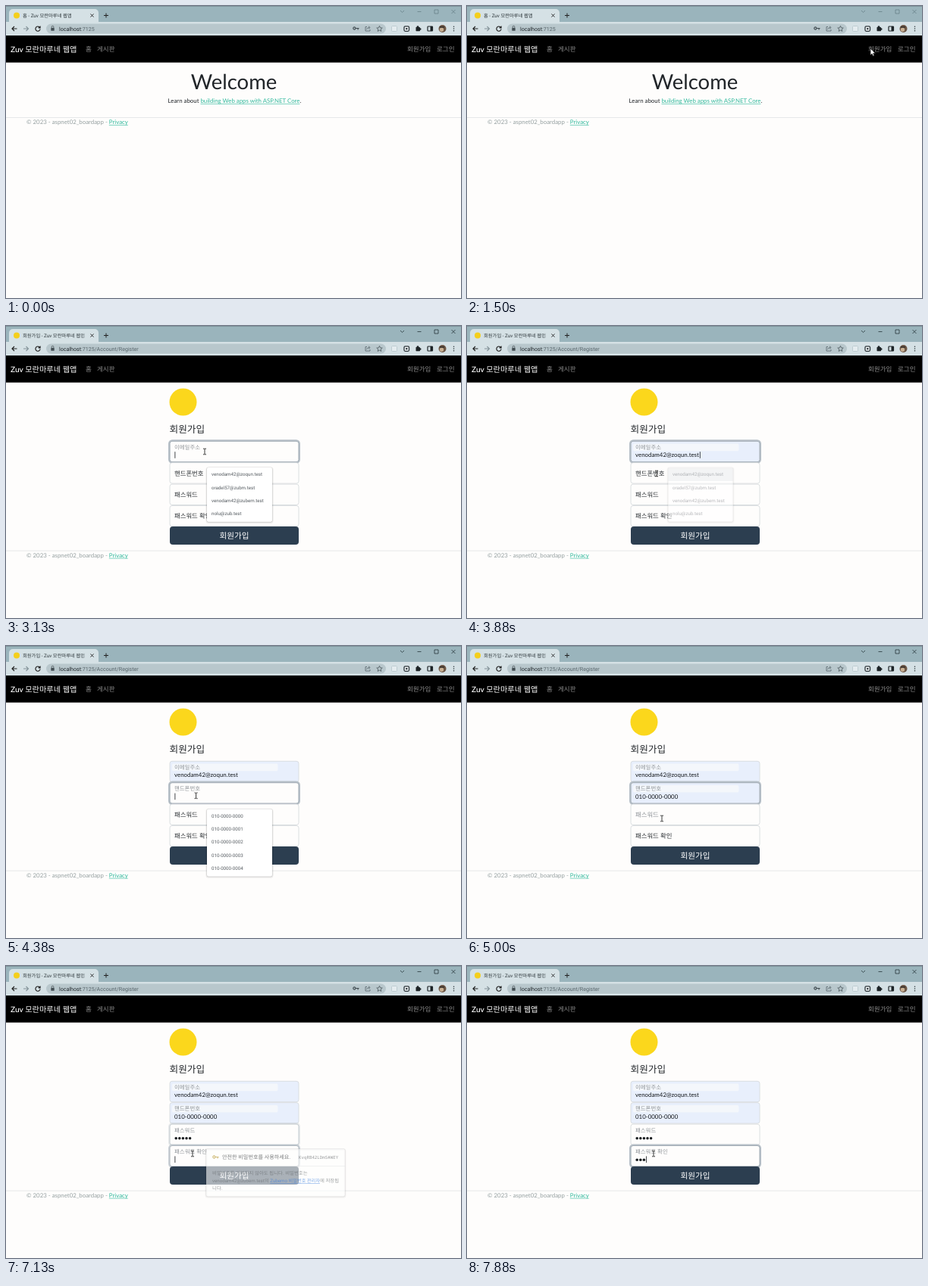
An HTML page with a canvas that plays this animation: 600x386 px, repeating every 8 s.

```html
<!DOCTYPE html>
<html lang="ko">
<head>
<meta charset="utf-8">
<style>
html, body { margin: 0; overflow: hidden; background: #fefdfc; }
canvas { display: block; }
</style>
</head>
<body>
<canvas id="stage" width="600" height="386"></canvas>
<script>
const c = document.getElementById('stage').getContext('2d');
c.textRendering = 'geometricPrecision';
const LOOP = 8000, LOAD = 1880, LOADED = 2630;
const BODY = "Lato, 'Noto Sans CJK KR', sans-serif";
const UI = "Roboto, 'Noto Sans CJK KR', sans-serif";
const MONO = "'Noto Sans Mono', monospace";
const BRAND = 'Zuv 모란마루네 웹앱';
const EMAIL = 'venodam42@zoqun.test', PHONE = '010-0000-0000';
const MAILS = [EMAIL, 'oradel57@zubm.test', 'venodam42@zubem.test', 'nolu@zub.test'];
const PHONES = [PHONE, '010-0000-0001', '010-0000-0002', '010-0000-0003', '010-0000-0004'];

// blur = when the field loses focus
const FIELDS = [
  { label: '이메일주소', focus: 2880, blur: 4130, value: EMAIL, filled: 3750 },
  { label: '핸드폰번호', focus: 4130, blur: 4980, value: PHONE, filled: 4700 },
  { label: '패스워드', focus: 4980, blur: 7000, keys: [5500, 5630, 5880, 6000, 6130] },
  { label: '패스워드 확인', focus: 7000, blur: 9000, keys: [7380, 7630, 7880] },
];
const POINTER = [
  [1100, 420, 390], [1480, 532, 56], [1900, 532, 56], [2370, 310, 123], [2450, 310, 123],
  [2800, 262, 166], [3400, 262, 166], [3800, 250, 195], [4300, 250, 195], [4750, 257, 228],
  [6130, 257, 228], [6450, 243, 248], [6750, 243, 248], [7000, 246, 248], [8000, 246, 248],
];

const clamp = v => Math.max(0, Math.min(1, v));
const ease = v => { v = clamp(v); return v * v * (3 - 2 * v); };
const mix = (a, b, k) => a + (b - a) * k;

function text(s, x, y, size, color, font = BODY, align = 'left', weight = 400) {
  c.font = `${weight} ${size}px ${font}`;
  c.fillStyle = color;
  c.textAlign = align;
  c.fillText(s, x, y);
  return x + c.measureText(s).width;
}
function link(s, x, y, size, color, font) {
  const end = text(s, x, y, size, color, font);
  rect(x, y + 1, end - x, 0.6, color);
  return end;
}
function rect(x, y, w, h, color) {
  c.fillStyle = color;
  c.fillRect(x, y, w, h);
}
function box(x, y, w, h, r, fill, stroke, width = 1) {
  c.beginPath();
  c.roundRect(x, y, w, h, r);
  if (fill) { c.fillStyle = fill; c.fill(); }
  if (stroke) { c.strokeStyle = stroke; c.lineWidth = width; c.stroke(); }
}
function disc(x, y, r, color) {
  c.beginPath();
  c.arc(x, y, r, 0, 7);
  c.fillStyle = color;
  c.fill();
}
function path(d, x, y, color, width = 1, fill) {
  const p = new Path2D(d);
  c.save();
  c.translate(x, y);
  if (fill) { c.fillStyle = fill; c.fill(p); }
  c.strokeStyle = color;
  c.lineWidth = width;
  c.stroke(p);
  c.restore();
}
function faded(alpha, draw) {
  if (alpha <= 0) return;
  c.save();
  c.globalAlpha = alpha;
  draw();
  c.restore();
}
// soft edge made of strokes, so that it stays clean while fading
function panel(x, y, w, h) {
  box(x, y + 0.7, w, h, 2, null, 'rgba(0,0,0,.07)', 3);
  box(x, y + 0.3, w, h, 2, null, 'rgba(0,0,0,.14)', 1);
  box(x, y, w, h, 2, '#fff');
}
function key(x, y, color) {
  path('M-.5 0a1.6 1.6 0 1 1-3.2 0a1.6 1.6 0 1 1 3.2 0H4M2.6 0V2', x, y, color, 1.1);
}

function browser(t) {
  const loading = t >= LOAD && t < LOADED, account = t >= LOAD;
  rect(0, 0, 600, 21, '#9ab4bc');
  rect(0, 0, 600, 1, '#7e949b');
  rect(0, 21, 600, 18, '#d5e1e5');
  box(4, 4, 118, 20, [5, 5, 0, 0], '#d5e1e5');

  if (loading) {
    c.beginPath();
    c.arc(14, 12.5, 3.3, t / 160, t / 160 + 4.2);
    c.strokeStyle = '#3b7de0';
    c.lineWidth = 1.2;
    c.stroke();
  } else disc(14, 12.5, 4, '#f4cf1c');
  c.save();
  c.beginPath();
  c.rect(20, 5, 87, 15);
  c.clip();
  text(loading ? 'https://localhost:7125/Account/Register' : (account ? '회원가입' : '홈') + ' - ' + BRAND,
    22, 14.8, 6.3, '#2b3438', UI);
  const fade = c.createLinearGradient(100, 0, 107, 0);
  fade.addColorStop(0, 'rgba(213,225,229,0)');
  fade.addColorStop(1, '#d5e1e5');
  rect(100, 5, 7, 15, fade);
  c.restore();
  path('M-2-2L2 2M2-2L-2 2', 113.5, 12.5, '#222');
  path('M-3 0H3M0-3V3', 132, 12.5, '#222');

  // the window only becomes active with the first click
  const control = account ? '#27363c' : '#688088';
  path('M-2.5-1L0 1.5L2.5-1', 522.5, 7, control, 0.8);
  path('M-2.5 0H2.5', 545, 7.5, control, 0.8);
  path('M-2.5-2.5H2.5V2.5H-2.5Z', 567.5, 7.5, control, 0.8);
  path('M-2.5-2.5L2.5 2.5M2.5-2.5L-2.5 2.5', 590, 7.5, control, 0.8);

  path('M3.5 0H-3M0-3L-3 0L0 3', 11, 30, '#222', 1.2);
  path('M-3.5 0H3M0-3L3 0L0 3', 26.5, 30, '#85949a', 1.1);
  if (loading) path('M-2.7-2.7L2.7 2.7M2.7-2.7L-2.7 2.7', 42, 30, '#222', 1.2);
  else path('M2.6-1.6A3.1 3.1 0 1 0 3.1.5M3.1-3.6V-1.2H.7', 42, 30, '#222', 1.2);

  box(53, 23.5, 448, 13, 6.5, '#b8c7cc');
  box(59.3, 29, 4.4, 3.8, 0.5, '#444f54');
  path('M-1.3 0V-1.4a1.3 1.3 0 0 1 2.6 0V0', 61.5, 29, '#444f54', 0.8);
  const x = text('localhost', 70, 32.7, 7.1, '#20282c', UI);
  text(':7125' + (account ? '/Account/Register' : ''), x, 32.7, 7.1, '#56646a', UI);
  if (t < LOADED || t >= 5500) key(461.5, 29.5, '#3d484d');
  path('M-1-2.5H-3V3H3V1M-1.5 1Q-1-1.5 2-1.5M1-3.2L3.2-1.5L1 .3', 477, 30, '#56646a', 0.8);
  path('M0-3.7L1.1-1.2L3.7-1L1.7.8L2.3 3.4L0 2L-2.3 3.4L-1.7.8L-3.7-1L-1.1-1.2Z', 492.5, 30, '#49565b', 0.8);

  box(508.5, 26.5, 7, 7, 1, '#e4ecef', '#bdcbd0');
  box(525, 26.8, 6.5, 6.5, 1.5, '#eef3f5', '#2b3439', 1.3);
  rect(527.2, 29, 2.2, 2.2, '#2b3439');
  box(540.5, 28, 5.5, 5.2, 0.6, '#1c2326');
  disc(543, 27.6, 1.4, '#1c2326');
  disc(546.2, 30.5, 1.3, '#1c2326');
  box(556, 27, 6.5, 6, 0.7, null, '#1c2326', 1.2);
  rect(559.5, 27, 3, 6, '#1c2326');
  disc(575.5, 30, 5, '#6b5544');
  disc(574.5, 31.2, 2.6, '#c9b193');
  rect(572, 27, 6, 1.6, '#38322d');
  for (const d of [-2.7, 0, 2.7]) disc(590.5, 30 + d, 0.8, '#30393d');
}

function navbar() {
  rect(0, 39, 600, 35.7, '#000');
  text(BRAND, 6, 60.5, 10.2, '#fff', BODY, 'left', 500);
  [['홈', 105], ['게시판', 120], ['회원가입', 529], ['로그인', 568]]
    .forEach(([s, x]) => text(s, x, 60, 8.5, '#8d8d8d'));
}

function footer(y) {
  rect(0, y, 600, 1, '#e6e8e9');
  const x = text('© 2023 - aspnet02_boardapp - ', 27, y + 9.2, 7.85, '#95a0a1');
  link('Privacy', x, y + 9.2, 7.85, '#2fb99c');
}

function home() {
  text('Welcome', 300.5, 109.6, 27.5, '#212529', BODY, 'center');
  const x = text('Learn about ', 213.5, 128.4, 7.85, '#212529');
  const end = link('building Web apps with ASP.NET Core', x, 128.4, 7.85, '#2fb99c');
  text('.', end, 128.4, 7.85, '#212529');
  footer(147);
}

function field(f, i, t) {
  const y = 152 + i * 28.4, h = 28;
  const lit = clamp((t - f.focus - 30) / 150) * (1 - clamp((t - f.blur - 30) / 150));
  const auto = f.value && t >= f.filled, active = t >= f.focus;
  if (lit) faded(lit, () => box(215.2, y - 0.6, 171.6, h + 1.2, 4, null, '#b7c0c8', 2.4));
  box(216, y + 0.3, 170, h - 0.6, 3, auto ? '#e8effc' : '#fefdfc', '#d3d8db', 0.8);
  if (lit) faded(lit, () => box(216, y + 0.3, 170, h - 0.6, 3, null, '#9ca8b2', 0.9));

  const up = ease((t - f.focus - 10) / 130);
  if (auto) box(219, y + 3.6, 139.5, 9.6, 2, '#f4f7fb');
  text(f.label, 222, y + mix(17.2, 11, up), mix(8.4, 7.4, up), active ? '#8f9499' : '#2b3034');

  const base = y + 21.2;
  let caret = 222.5;
  if (auto) caret = text(f.value, 222, base, 7.9, '#15191c') + 1;
  if (f.keys) {
    const n = f.keys.filter(k => t >= k).length;
    for (let k = 0; k < n; k++) disc(224.2 + k * 4.6, base - 2.2, 1.75, '#15191c');
    if (n) caret = 222 + n * 4.6 + 0.3;
  }
  const typed = Math.max(f.focus + 100, ...[f.filled, ...(f.keys || [])].filter(k => k <= t));
  if (t >= typed && t < f.blur && (t - typed) % 1000 < 500) rect(caret, base - 7, 0.8, 8.6, '#15191c');
}

function dropdown(t, items, y, open, pick) {
  const alpha = clamp((t - open) / 100) * (t < pick ? 1 : 0.85 - (t - pick) / 300);
  faded(alpha, () => {
    panel(265, y, 86, items.length * 17.2 + 3);
    if (t >= pick - 300) rect(265, y + 1, 86, 17, '#e2e4e6');
    items.forEach((s, i) => text(s, 271, y + 11.4 + i * 17.2, 6.2, '#555b60', UI));
  });
}

function passwordHint(t) {
  faded(clamp((t - 5150) / 150) * (1 - clamp((t - 7050) / 200)), () => {
    panel(264, 241.7, 183, 62.8);
    key(276.5, 252.5, '#b08f20');
    text('안전한 비밀번호를 사용하세요.', 285, 255, 7.1, '#25292c', UI);
    text('KvqRB42LDmS#WEY', 386, 254.5, 5.8, '#55595c', MONO);
    rect(264, 264, 183, 0.7, '#dcdfe1');
    const gray = '#5f6468';
    text('비밀번호를 기억하지 않아도 됩니다. 비밀번호는', 272, 276, 6.4, gray, UI);
    let x = text('venodam42@zubem.test', 272, 286, 6.2, gray, UI);
    x = text('의 ', x, 286, 6.4, gray, UI);
    x = link('Zubemo 비밀번호 관리자', x, 286, 6.2, '#2a74dc', UI);
    text('에 저장됩', x, 286, 6.4, gray, UI);
    text('니다.', 272, 295.8, 6.4, gray, UI);
  });
}

function register(t) {
  disc(233.5, 100.5, 18, '#fbd71c');
  text('회원가입', 215.5, 141, 12.7, '#25292d');
  FIELDS.forEach((f, i) => field(f, i, t));
  box(216, 265, 170, 24, 4, '#2c3e50');
  text('회원가입', 301, 281, 10.6, '#fff', BODY, 'center');
  footer(296.6);
  dropdown(t, MAILS, 187, 3000, 3750);
  dropdown(t, PHONES, 215.5, 4250, 4700);
  passwordHint(t);
}

function pointer(t) {
  const i = POINTER.findIndex(p => p[0] > t);
  if (i < 1) return;
  const [t0, x0, y0] = POINTER[i - 1], [t1, x1, y1] = POINTER[i];
  const k = ease((t - t0) / (t1 - t0)), x = mix(x0, x1, k), y = mix(y0, y1, k);
  if (t > 2450 && y > 152) path('M-2-3.8H-.6L0-3.3L.6-3.8H2M0-3.3V3.3M-2 3.8H-.6L0 3.3L.6 3.8H2', x, y, '#222', 0.9);
  else path('M0 0V9L2.1 7.2L3.5 10.2L5 9.5L3.7 6.6H6.4Z', x, y, '#222', 0.8, '#fff');
}

function draw(now) {
  const t = now % LOOP;
  rect(0, 0, 600, 386, '#fefdfc');
  browser(t);
  navbar();
  if (t < LOAD) home();
  else register(t);
  pointer(t);
  requestAnimationFrame(draw);
}
requestAnimationFrame(draw);
</script>
</body>
</html>
```
